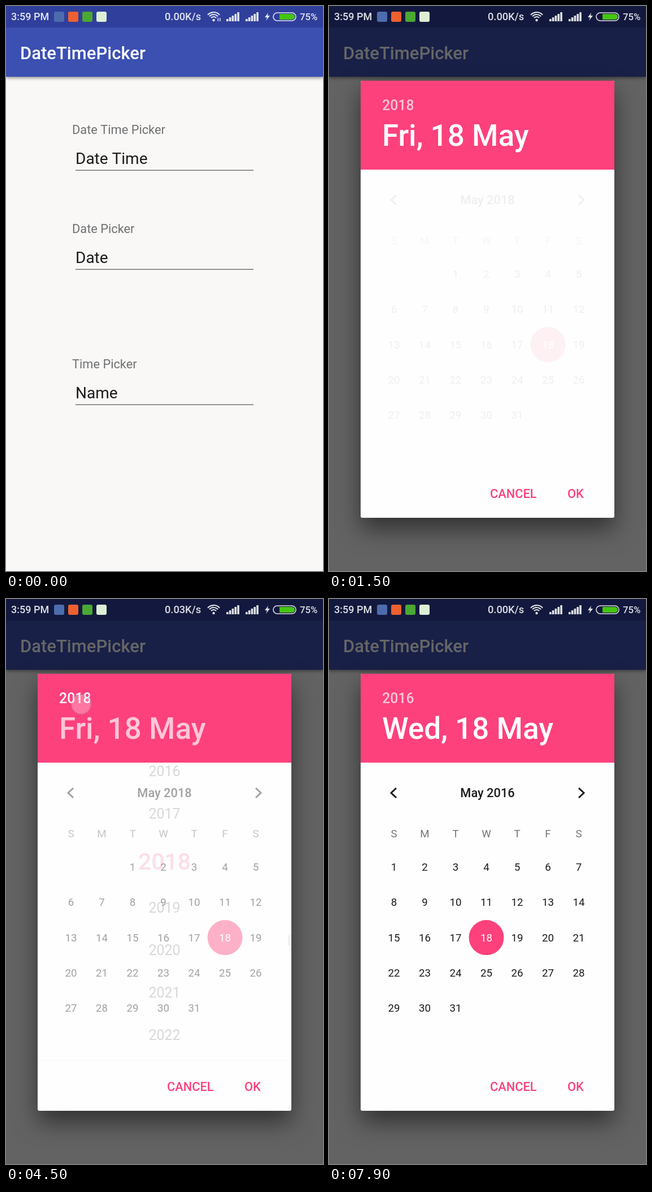
Animation, 561 px wide and 998 px high, one loop 8000 ms. Source, as an HTML page with a canvas:

```html
<!DOCTYPE html>
<html lang="en">
<head>
<meta charset="utf-8">
<title>Date picker</title>
<style>
html, body { margin: 0; width: 561px; height: 998px; overflow: hidden; }
canvas { display: block; }
</style>
</head>
<body>
<canvas id="stage" width="561" height="998"></canvas>
<script>
const ctx = document.getElementById('stage').getContext('2d');
const LOOP = 8000, STEP = 100;
const PINK = '#fd417d', INK = '#1b1b1b', PAPER = '#fdfefd';
const OPEN = 1400, TO_YEARS = 4400, SCROLL = 5300, PICK = 6500;

const ramp = (t, from, to) => Math.min(1, Math.max(0, (t - from) / (to - from)));

// y is the middle of the capitals
function text(str, x, y, size, color, weight = 400, align = 'left') {
  ctx.font = `${weight} ${size}px Roboto, sans-serif`;
  ctx.textAlign = align;
  ctx.fillStyle = color;
  ctx.fillText(str, x, y + size * 0.356);
}

function rect(x, y, w, h, color) {
  ctx.fillStyle = color;
  ctx.fillRect(x, y, w, h);
}

function round(x, y, w, h, r, color) {
  ctx.beginPath();
  ctx.roundRect(x, y, w, h, r);
  ctx.fillStyle = color;
  ctx.fill();
}

function disc(x, y, r, color) {
  ctx.beginPath();
  ctx.arc(x, y, r, 0, Math.PI * 2);
  ctx.fillStyle = color;
  ctx.fill();
}

function line(points, color, width) {
  ctx.beginPath();
  points.forEach(([x, y]) => ctx.lineTo(x, y));
  ctx.strokeStyle = color;
  ctx.lineWidth = width;
  ctx.stroke();
}

function shadowed(color, blur, dy, draw) {
  ctx.save();
  ctx.shadowColor = color;
  ctx.shadowBlur = blur;
  ctx.shadowOffsetY = dy;
  draw();
  ctx.restore();
}

function field(label, value, y) {
  text(label, 117, y, 21.8, '#707070');
  text(value, 123, y + 51, 28, INK);
  rect(123, y + 71.5, 315, 1.5, '#757575');
}

function drawForm(t) {
  rect(0, 0, 561, 998, t < 1100 ? '#f9f8f7' : '#f7f9f7');
  shadowed('rgba(0,0,0,.45)', 6, 2, () => rect(0, 0, 561, 125, '#3c50b2'));
  rect(0, 0, 561, 38, '#2f3f9b');
  text('DateTimePicker', 25, 83, 31, '#fff', 500);
  field('Date Time Picker', 'Date Time', 218);
  field('Date Picker', 'Date', 393);
  field('Time Picker', 'Name', 632);
}

function drawStatus(t) {
  const white = 'rgba(255,255,255,.87)';
  text('3:59 PM', 9, 19, 18, white, 500);
  ['#4d6cae', '#ee6030', '#4aa833', '#dcefd5'].forEach((c, i) => round(85 + 25 * i, 10, 18, 18, 3, c));
  text(t >= 2100 && t < SCROLL ? '0.03K/s' : '0.00K/s', 281, 19, 18.2, white, 500);

  disc(367.5, 25, 2.2, white);
  ctx.strokeStyle = white;
  ctx.lineWidth = 2.2;
  for (const r of [6, 10, 14]) {
    ctx.beginPath();
    ctx.arc(367.5, 25, r, -Math.PI * 0.77, -Math.PI * 0.23);
    ctx.stroke();
  }
  if (t < 300) for (const x of [374.5, 378]) rect(x, 21, 1.5, 6, white);

  for (const x of [390, 424])
    for (let i = 0; i < 5; i++) rect(x + 4.8 * i, 23 - 3 * i, 3.6, 4 + 3 * i, white);

  ctx.beginPath();
  for (const [x, y] of [[464, 12], [458, 20], [462, 20], [460, 26], [467, 17], [463, 17]]) ctx.lineTo(x, y);
  ctx.fillStyle = white;
  ctx.fill();

  ctx.beginPath();
  ctx.roundRect(473, 12, 40, 14, 7);
  ctx.strokeStyle = white;
  ctx.lineWidth = 1.6;
  ctx.stroke();
  round(484, 14, 27, 10, [1, 5, 5, 1], '#45c512');
  text('75%', 520, 19, 16.8, white, 500);
}

function drawCalendar(year, alpha) {
  if (!alpha) return;
  ctx.globalAlpha = alpha;
  line([[119, 334], [110, 342.5], [119, 351]], INK, 3);
  line([[442, 334], [451, 342.5], [442, 351]], INK, 3);
  text('May ' + year, 280.5, 342.5, 21.8, INK, 500, 'center');
  const columnX = c => 115 + 54.5 * c;
  [...'SMTWTFS'].forEach((d, c) => text(d, columnX(c), 414, 18.7, '#757575', 400, 'center'));
  const first = new Date(year, 4, 1).getDay();
  for (let day = 1; day <= 31; day++) {
    const cell = day - 1 + first;
    const x = columnX(cell % 7), y = 473.5 + 62.3 * Math.floor(cell / 7);
    const selected = day === 18;
    if (selected) {
      disc(x, y, 31, PINK);
      ctx.globalAlpha = 1;
    }
    text(day, x, y, 18.7, selected ? '#fff' : INK, 400, 'center');
    ctx.globalAlpha = alpha;
  }
  ctx.globalAlpha = 1;
}

const scrollAt = t => 317 * (1 - (1 - ramp(t, SCROLL, 6000)) ** 2.2);

function drawYears(t, alpha) {
  if (!alpha) return;
  const middle = 463 + scrollAt(t);
  ctx.save();
  ctx.globalAlpha = alpha;
  ctx.beginPath();
  ctx.rect(56, 289, 449, 528);
  ctx.clip();
  if (t >= 6300) rect(56, middle - 196, 449, 73, '#f9faf9');
  for (let year = 2008; year <= 2024; year++) {
    const n = year - 2018;
    const y = middle + 75 * n + Math.sign(n) * (n < 0 ? 9 : 7);
    if (n) text(year, 280.5, y, 24.9, INK, 400, 'center');
    else text(year, 280.5, y, 41, PINK, 500, 'center');
  }
  const thumb = 1 - ramp(t, 6000, 6300);
  rect(499, 594 - scrollAt(t) * 0.035, 6, 18, `rgba(0,0,0,${0.3 * thumb})`);
  rect(56, 814.5, 449, 1.5, '#dcdcdc');
  ctx.restore();
}

function drawDialog(t) {
  shadowed('rgba(0,0,0,.5)', 42, 20, () => round(56, 132, 449, 772, 3, PAPER));
  round(56, 132, 449, 157, [3, 3, 0, 0], PINK);

  const choosing = t >= TO_YEARS && t < PICK;
  const year = t < PICK ? 2018 : 2016;
  const shade = on => on ? '#fff' : 'rgba(255,255,255,.7)';
  text(year, 94, 175, 24.9, shade(choosing), 500);
  text(year === 2018 ? 'Fri, 18 May' : 'Wed, 18 May', 94, 228.5, 53, shade(!choosing), 500);

  const appear = ramp(t, 1475, 1850) * (1 - ramp(t, 4340, 4610));
  drawCalendar(year, t < PICK ? appear : ramp(t, 6520, 6950));
  drawYears(t, ramp(t, 4430, 4850) * (1 - ramp(t, 6440, 6750)));

  text('CANCEL', 285, 861, 21.8, PINK, 500);
  text('OK', 422, 861, 21.8, PINK, 500);
}

function drawTouch(t, from, to, x, y) {
  if (t < from || t >= to) return;
  disc(x, y, 17, 'rgba(255,255,255,.28)');
  ctx.strokeStyle = 'rgba(150,150,190,.28)';
  ctx.lineWidth = 2;
  ctx.stroke();
}

function draw(t) {
  drawForm(t);
  const opened = ramp(t, OPEN - 100, OPEN + 100);
  rect(0, 0, 561, 998, `rgba(0,0,0,${0.6 * opened})`);
  drawStatus(t);
  if (t >= OPEN) {
    ctx.globalAlpha = 1;
    drawDialog(t);
  }
  drawTouch(t, 1200, 1400, 342, 257);
  drawTouch(t, 4300, 4600, 133, 186);
  drawTouch(t, SCROLL, 5600, 300, 480 + scrollAt(t));
  drawTouch(t, 6200, 6500, 304, 628);
}

const start = performance.now();
function tick() {
  const t = (performance.now() - start) % LOOP;
  draw(Math.floor(t / STEP) * STEP);
  requestAnimationFrame(tick);
}
tick();
</script>
</body>
</html>
```
